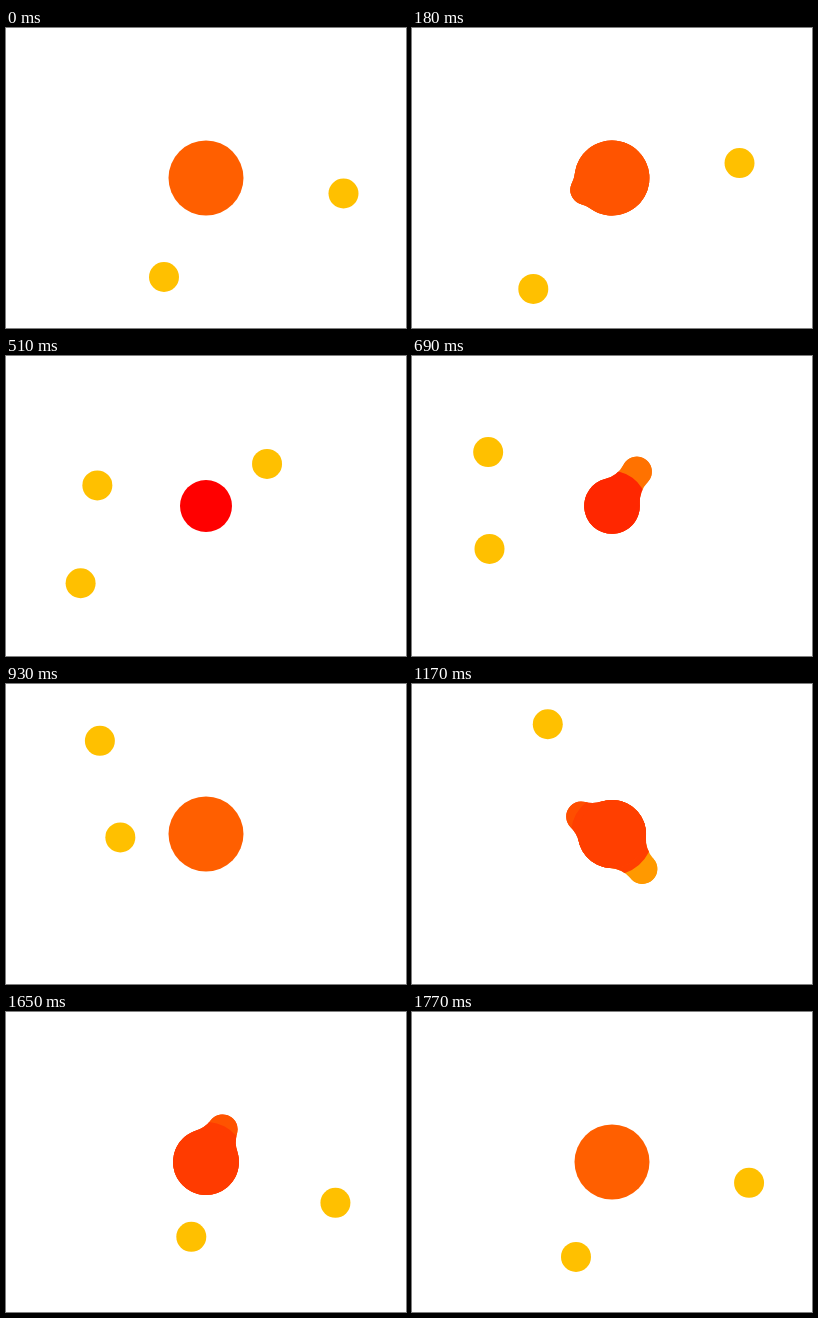
Write an HTML page with a canvas that moves like this. It is 400x300 px and loops after 1800 ms.

```html
<!DOCTYPE html>
<html lang="en">
<head>
<meta charset="utf-8">
<title>Orbiting drops</title>
<style>
html, body { margin: 0; width: 100%; height: 100%; overflow: hidden; background: #fff; }
canvas { display: block; filter: blur(.6px); }
</style>
</head>
<body>
<canvas id="stage" width="400" height="300"></canvas>
<script>
const ctx = document.getElementById('stage').getContext('2d');
const LOOP = 1800, DROP = 15, TAU = Math.PI * 2;

// Six evenly timed points on each closed orbit, relative to the core
const orbits = [
  [[137.5, 15.5], [109, -31], [41, -40], [7, -9], [36, 39], [106.5, 56.5]],
  [[-42, 99], [-101, 106.5], [-127, 60], [-92, 8], [-25, -16], [0, 43]],
  [[18, 0], [-64, 6.5], [-119.5, -37], [-110, -89], [-58, -109], [-5, -70]]
];

const clamp = v => Math.min(1, Math.max(0, v));
const smooth = v => (v = clamp(v)) * v * (3 - 2 * v);
const fillOf = green => `rgb(255,${Math.round(green)},0)`;

// Periodic cubic; the 0.6 tangent scale keeps sixty-degree arcs round
function place(points, t) {
  const n = points.length, pos = t / LOOP * n, i = Math.floor(pos), u = pos - i;
  const [a, b, c, d] = [n - 1, 0, 1, 2].map(k => points[(i + k) % n]);
  return [0, 1].map(k =>
    b[k] + (c[k] - b[k]) * smooth(u)
    + 0.6 * u * (1 - u) * ((c[k] - a[k]) * (1 - u) - (d[k] - b[k]) * u));
}

function disc(x, y, r, fill) {
  ctx.fillStyle = fill;
  ctx.beginPath();
  ctx.arc(x, y, r, 0, TAU);
  ctx.fill();
}

// Core and drop joined by rounded fillets; false when they do not touch
function bridge(core, dist) {
  const f = 30 * clamp(1 - (dist - core - DROP) / 8);
  const side = core + f, other = DROP + f;
  const a = (side * side - other * other + dist * dist) / (2 * dist);
  const h = Math.sqrt(Math.max(0, side * side - a * a));
  if (h === 0 || (h <= f && a < dist)) return false;
  const p = Math.atan2(h, a), q = Math.atan2(h, a - dist);
  ctx.beginPath();
  ctx.arc(0, 0, core, p, TAU - p);
  ctx.arc(a, -h, f, Math.PI - p, Math.PI - q, true);
  ctx.arc(dist, 0, DROP, -q, q);
  ctx.arc(a, h, f, q - Math.PI, p - Math.PI, true);
  ctx.closePath();
  return true;
}

function draw(now) {
  const t = now % LOOP;
  const drops = orbits.map(points => {
    const [x, y] = place(points, t), dist = Math.hypot(x, y);
    return { x, y, dist, near: clamp((54 - dist) / 28) };
  });
  const heat = Math.max(...drops.map(d => d.near));
  const core = 26 + 11.5 * smooth((heat - 0.25) / 0.65);
  const coreGreen = 95 * heat, coreFill = fillOf(coreGreen);

  ctx.setTransform(1, 0, 0, 1, 0, 0);
  ctx.fillStyle = '#fff';
  ctx.fillRect(0, 0, 400, 300);
  ctx.translate(200, 150);

  for (const d of drops) {
    const blend = clamp(1.5 * d.near - 0.11);
    const fill = fillOf(192 + (coreGreen - 192) * blend);
    disc(d.x, d.y, DROP, fill);
    ctx.save();
    ctx.rotate(Math.atan2(d.y, d.x));
    if (d.dist > 1 && bridge(core, d.dist)) {
      ctx.fillStyle = fill;
      ctx.fill();
      ctx.clip();
      disc(0, 0, core + 7, coreFill);
    }
    ctx.restore();
  }
  disc(0, 0, core, coreFill);
}

let start;
function tick(now) {
  start ??= now;
  draw(now - start);
  requestAnimationFrame(tick);
}
draw(0);
requestAnimationFrame(tick);
</script>
</body>
</html>
```
